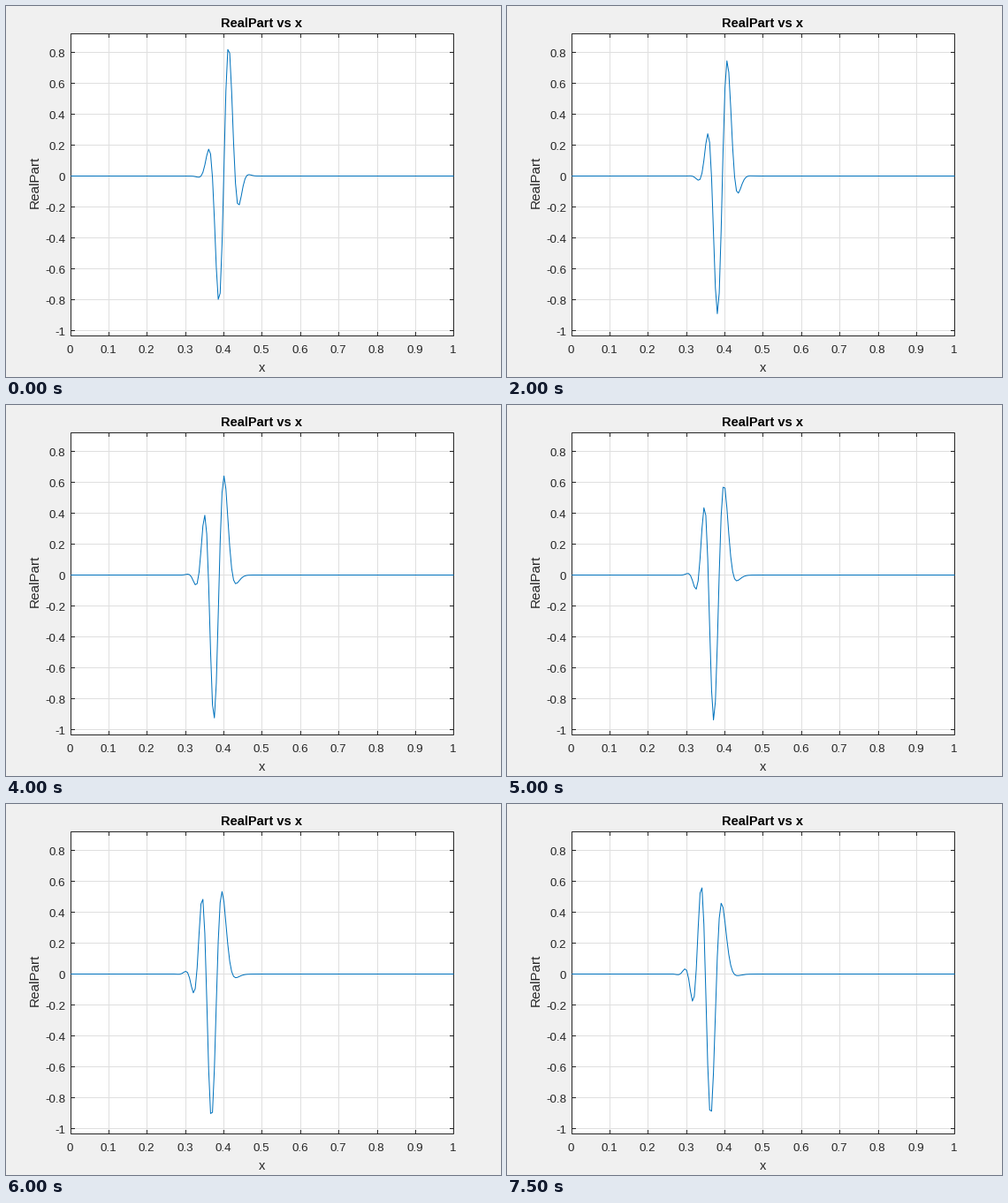
Recreate the animation shown at these times as a matplotlib script. Size 560 by 420 pixels, loop 8000 ms.

```python
import numpy as np
import matplotlib.pyplot as plt
from matplotlib.animation import FuncAnimation

W, H, DPI = 560, 420, 100
PX = 72 / DPI                      # points per pixel
FRAMES, INTERVAL = 16, 500
INK, BLUE, GRID = "#262626", "#0072BD", "#DFDFDF"
LEFT, RIGHT, TOP, BOTTOM = 73.5, 506.5, 31.5, 373.5
TICK = 4.5

# Gaussian wave packet on a lattice, evolved exactly in Fourier space
N = 200
DX = 1 / N
DT = 2.48e-5
K0 = -106.2
x = np.arange(N) * DX
psi0 = np.exp(-1000 * (x - 0.4) ** 2 + 1j * K0 * x)
spectrum = np.fft.fft(psi0)
omega = (1 - np.cos(2 * np.pi * np.fft.fftfreq(N))) / DX ** 2


def real_part(i):
    psi = np.fft.ifft(spectrum * np.exp(-1j * omega * DT * i)).real
    return np.append(psi, psi[0])


def to_x(v):
    return 73.2 + 433.5 * v


def to_y(v):
    return 192.5 - 175 * v


def crisp(v):
    return np.floor(v) + 0.5


fig = plt.figure(figsize=(W / DPI, H / DPI), dpi=DPI, facecolor="#F0F0F0")
ax = fig.add_axes([0, 0, 1, 1])
ax.set_xlim(0, W)
ax.set_ylim(H, 0)
ax.axis("off")


def line(xs, ys, color, z):
    # coordinates already sit on pixel centres, so snapping stays off
    return ax.plot(xs, ys, color=color, lw=PX, zorder=z, snap=False,
                   solid_capstyle="butt", solid_joinstyle="miter")[0]


def text(px, py, s, size, color=INK, **kw):
    opts = dict(ha="center", va="baseline", family="Liberation Sans")
    ax.text(px, py, s, fontsize=size * PX, color=color, **{**opts, **kw})


ax.fill([LEFT, RIGHT, RIGHT, LEFT], [TOP, TOP, BOTTOM, BOTTOM],
        color="white", lw=0, zorder=0, snap=False)

for n in range(11):
    v = n / 10
    px = crisp(to_x(v))
    if 0 < n < 10:
        line([px, px], [TOP, BOTTOM], GRID, 1)
        line([px, px], [TOP, TOP + TICK], INK, 3)
        line([px, px], [BOTTOM, BOTTOM - TICK], INK, 3)
    text(to_x(v) - 0.7, 393, f"{v:g}", 13.33)

for n in range(-5, 5):
    v = n / 5
    py = crisp(to_y(v))
    line([LEFT, RIGHT], [py, py], GRID, 1)
    line([LEFT, LEFT + TICK], [py, py], INK, 3)
    line([RIGHT, RIGHT - TICK], [py, py], INK, 3)
    text(67.3, py + 5.5 - 0.1, f"{v:g}", 13.33, ha="right")

ax.add_patch(plt.Rectangle((LEFT, TOP), RIGHT - LEFT, BOTTOM - TOP, fill=False,
                           ec=INK, lw=PX, zorder=3, snap=False))

text(289.2, 24, "RealPart vs x", 14.67, "black", weight="bold")
text(290, 414, "x", 14.67)
text(37, 199.5, "RealPart", 15.2, rotation=90, rotation_mode="anchor")

curve = line(to_x(np.append(x, 1)), to_y(real_part(0)), BLUE, 4)
curve.set_solid_joinstyle("round")


def update(i):
    curve.set_ydata(to_y(real_part(i)))
    return curve,


anim = FuncAnimation(fig, update, frames=FRAMES, interval=INTERVAL,
                     repeat=True, repeat_delay=0)
plt.show()
```
